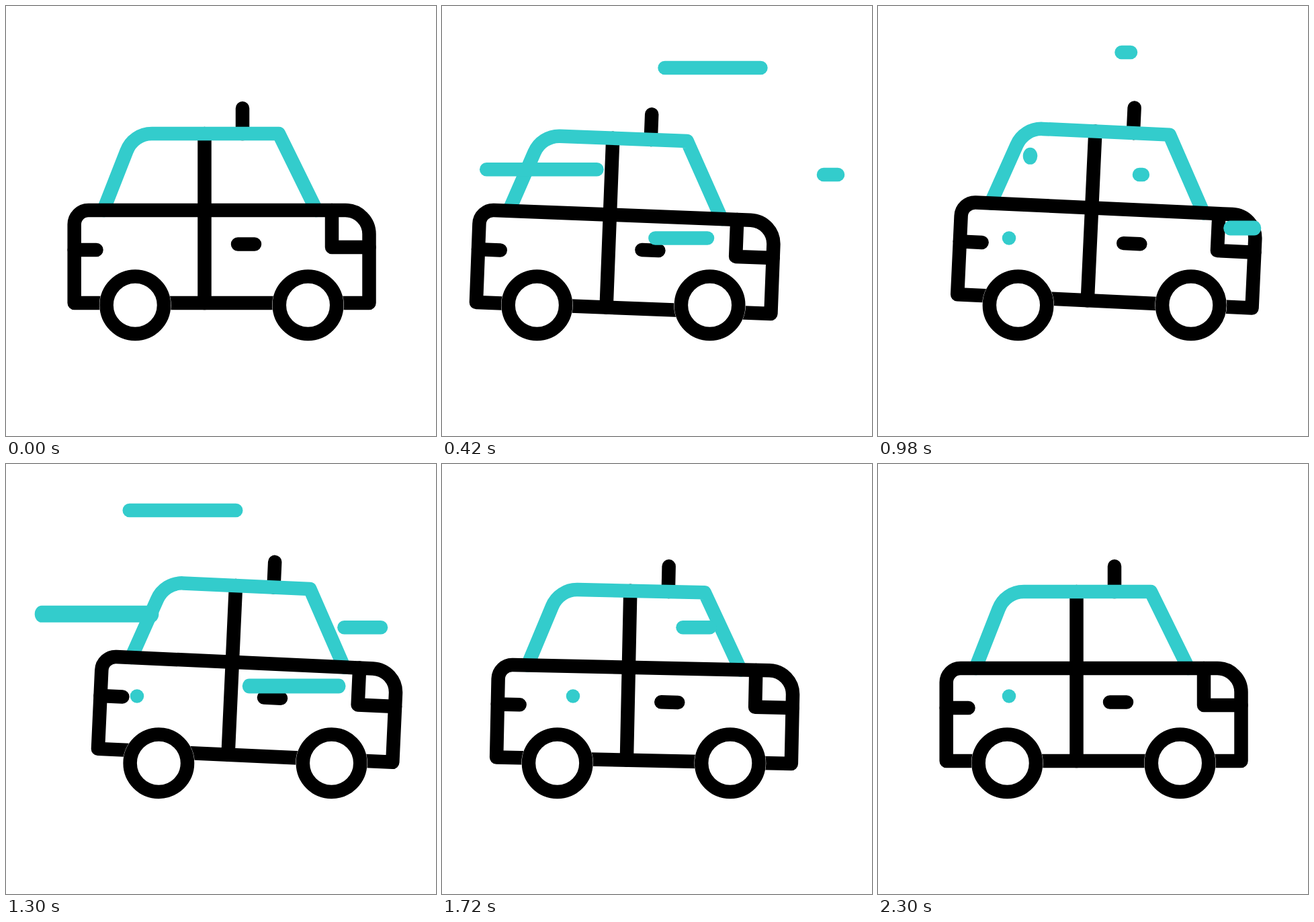
Recreate the animation shown at these times as an HTML page. Size 640 by 640 pixels, loop 2.4 s.

```html
<!DOCTYPE html>
<html lang="en">
<head>
<meta charset="utf-8">
<title>Driving car</title>
<style>
  html, body { margin: 0; width: 100%; height: 100%; overflow: hidden; background: #fff; }
  svg { display: block; width: 100vw; height: 100vh; }
  path, circle { fill: none; stroke: #000; stroke-width: 20.5; stroke-linecap: round; stroke-linejoin: round; }
  .teal { stroke: #3cc; }
  .gap { fill: #fff; stroke: none; }
</style>
</head>
<body>
<svg viewBox="0 0 640 640">
  <g id="body">
    <path d="M352 152.3V190M295.5 190V442"/>
    <path class="teal" d="M145 304L179.5 216A40 40 0 0 1 217 190H406L462 304"/>
    <path d="M101.7 442V325a21 21 0 0 1 21-21H505a35.5 35.5 0 0 1 35.5 35.5V442Z"/>
    <path d="M101.7 363H134.5M485 304V359H540.5M345 354.5H370"/>
  </g>
  <g id="wheels">
    <circle class="gap" cx="192.3" cy="445.2" r="53.4"/>
    <circle cx="192.3" cy="445.2" r="42.7"/>
    <circle class="gap" cx="449.5" cy="445.2" r="53.4"/>
    <circle cx="449.5" cy="445.2" r="42.7"/>
  </g>
  <g id="wind"></g>
</svg>
<script>
const LOOP = 2400;
const HEAD_TIME = 433, TAIL_DELAY = 284, TAIL_TIME = 400;

// [time, value] keys, eased between neighbours
const shiftKeys = [[0, 0], [533, -57.6], [1200, 41.5], [1700, -20.7], [2300, 0]];
const bounceKeys = [[0, 0], [633, 10.2], [1200, -9], [1700, -0.7], [2300, 0]];
const tiltKeys = [[0, 0], [567, 2.65], [1233, 2.65], [2167, 0]];

const streaks = [
  { start: 0, y: 92, from: 527, to: 331 },
  { start: 93, y: 243.2, from: 237, to: 36 },
  { start: 236, y: 345.5, from: 395, to: 195, stays: true },
  { start: 333, y: 251, from: 589, to: 389 },
  { start: 863, y: 330.5, from: 560, to: 362, stretch: 1.07 },
  { start: 911, y: 69, from: 376, to: 178 },
  { start: 962, y: 223.3, from: 227, to: 28.5, stretch: 1.22 },
  { start: 1151, y: 243.2, from: 558, to: 358.5 }
];

const body = document.getElementById('body');
const wheels = document.getElementById('wheels');
const wind = document.getElementById('wind');

for (const s of streaks) {
  s.path = document.createElementNS('http://www.w3.org/2000/svg', 'path');
  s.path.setAttribute('class', 'teal');
  s.path.setAttribute('transform', `translate(0 ${s.y}) scale(1 ${s.stretch || 1})`);
  wind.append(s.path);
}

function ease(p) {
  p = Math.min(1, Math.max(0, p));
  return p * p * (3 - 2 * p);
}

function valueAt(keys, t) {
  let value = keys[0][1];
  for (let i = 1; i < keys.length; i++) {
    const [t0, v0] = keys[i - 1], [t1, v1] = keys[i];
    value += (v1 - v0) * ease((t - t0) / (t1 - t0));
  }
  return value;
}

function drawStreak(s, t) {
  const age = t - s.start;
  const visible = age > 0 && (s.stays || age < TAIL_DELAY + TAIL_TIME);
  s.path.style.display = visible ? '' : 'none';
  const xAt = p => (s.from + (s.to - s.from) * ease(p)).toFixed(2);
  s.path.setAttribute('d', `M${xAt(age / HEAD_TIME)} 0H${xAt((age - TAIL_DELAY) / TAIL_TIME)}`);
}

function draw(t) {
  const x = valueAt(shiftKeys, t);
  wheels.setAttribute('transform', `translate(${x} 0)`);
  body.setAttribute('transform',
    `translate(${x} ${valueAt(bounceKeys, t)}) rotate(${valueAt(tiltKeys, t)} 321 442)`);
  for (const s of streaks) drawStreak(s, t);
}

let origin;
function tick(now) {
  origin ??= now;
  draw((now - origin) % LOOP);
  requestAnimationFrame(tick);
}
draw(0);
requestAnimationFrame(tick);
</script>
</body>
</html>
```
